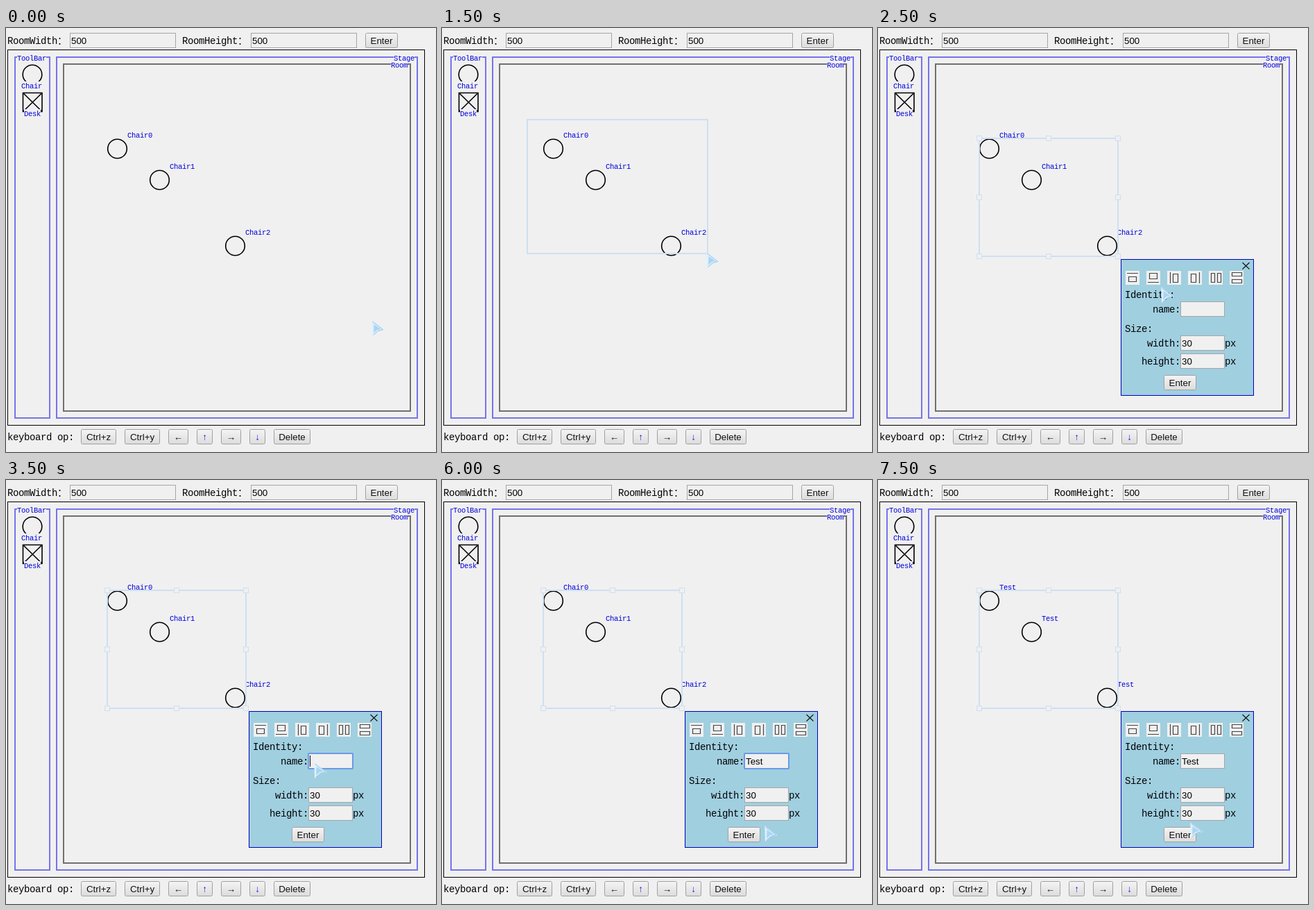
Animation, 620 px wide and 611 px high, one loop 8000 ms. Source, as an HTML page:

```html
<!DOCTYPE html>
<html lang="en">
<head>
<meta charset="utf-8">
<title>Room editor</title>
<style>
  html, body { margin: 0; width: 100%; height: 100%; overflow: hidden; background: #f0f0f0; }
  svg { display: block; }
  text { white-space: pre; }
  .mono { font: 14px "Liberation Mono", "Noto Sans CJK SC", monospace; letter-spacing: -.4px; }
  .tag { font: 10.5px "Liberation Mono", monospace; letter-spacing: -.3px; fill: #0000dc; }
  .ui { font: 13.333px "Liberation Sans", Arial, sans-serif; }
</style>
</head>
<body>
<svg id="stage" width="620" height="611" viewBox="0 0 620 611">
  <defs>
    <linearGradient id="face" x2="0" y2="1">
      <stop offset="0" stop-color="#f4f4f4"/><stop offset="1" stop-color="#dcdcdc"/>
    </linearGradient>
    <linearGradient id="glass" x2="1" y2="1">
      <stop offset="0" stop-color="#d6ecf9"/><stop offset="1" stop-color="#8fc6ec"/>
    </linearGradient>
  </defs>
</svg>
<script>
const BG = '#f0f0f0', PALE = '#cfdff2', VIOLET = '#7474ee', LOOP = 8000;
const stage = document.getElementById('stage');

function el(parent, tag, attrs, content) {
  const node = document.createElementNS('http://www.w3.org/2000/svg', tag);
  for (const key in attrs) node.setAttribute(key, attrs[key]);
  if (content) node.textContent = content;
  return parent.appendChild(node);
}
const group = parent => el(parent, 'g', {});
const rect = (p, x, y, width, height, fill, stroke = 'none', w = 1, rx = 0) =>
  el(p, 'rect', { x, y, width, height, fill, stroke, 'stroke-width': w, rx });
const path = (p, d, stroke, w, fill = 'none') =>
  el(p, 'path', { d, stroke, 'stroke-width': w, fill });
const text = (p, cls, x, y, s) => el(p, 'text', { class: cls, x, y }, s);
const circle = (cx, cy) =>
  el(stage, 'circle', { cx, cy, r: 13.8, fill: 'none', stroke: '#000', 'stroke-width': 1.6 });

// A label that knocks out the border behind it
function caption(x, y, s) {
  rect(stage, x, y - 10, s.length * 6, 12, BG);
  text(stage, 'tag', x, y, s);
}
function field(p, x, y, w, value) {
  rect(p, x + .5, y + .5, w - 1, 21, BG, '#a5a5a5');
  return text(p, 'ui', x + 2, y + 16, value);
}
function button(p, x, y, w, s, color = '#111') {
  rect(p, x + .5, y + .5, w - 1, 21, 'url(#face)', '#a0a0a0', 1, 2);
  const label = text(p, 'ui', x + w / 2, y + 16, s);
  label.setAttribute('text-anchor', 'middle');
  label.setAttribute('fill', color);
}

// Top and bottom rows
text(stage, 'mono', 2, 23, 'RoomWidth：');
field(stage, 92, 7, 153, '500');
text(stage, 'mono', 254, 23, 'RoomHeight：');
field(stage, 353, 7, 153, '500');
button(stage, 518, 7, 47, 'Enter');
text(stage, 'mono', 2, 594, 'keyboard op:');
[[108, 51, 'Ctrl+z'], [171, 51, 'Ctrl+y'], [234, 29, '←'], [275, 23, '↑', '#2020d0'],
 [310, 29, '→'], [351, 23, '↓', '#2020d0'], [386, 53, 'Delete']]
  .forEach(([x, w, s, color]) => button(stage, x, 578, w, s, color));

// Frames and toolbar
rect(stage, 2.5, 31.5, 601, 541, 'none', '#000');
rect(stage, 13, 42, 50, 520, 'none', VIOLET, 2);
rect(stage, 73, 42, 520, 520, 'none', VIOLET, 2);
rect(stage, 83, 52, 500, 500, 'none', '#707070', 2);
caption(16, 47, 'ToolBar');
caption(559, 47, 'Stage');
caption(555, 57, 'Room');
circle(38, 67);
caption(22, 87, 'Chair');
path(stage, 'M24.5 93.5h27.5v27h-27.5zl27.5 27m0-27l-27.5 27', '#000', 1.6);
caption(26, 127, 'Desk');

// Chairs
const names = [[160.5, 174], [221.5, 219], [330.5, 314]].map(([x, y]) => {
  circle(x, y);
  return text(stage, 'tag', x + 14.5, y - 16, '');
});

// Rubber band and resize box
const band = rect(stage, 123, 132, 0, 0, 'none', PALE, 2);
const chosen = group(stage);
rect(chosen, 146, 159, 200, 170, 'none', PALE, 2);
for (let i = 0; i < 9; i++) {
  if (i !== 4) rect(chosen, 142.5 + i % 3 * 100, 155.5 + Math.floor(i / 3) * 85, 7, 7, BG, PALE);
}

// Property panel
const panel = group(stage);
rect(panel, 350.5, 333.5, 191, 196, '#a0cfe0', '#0000b4');
path(panel, 'M525.5 338l10 9.5m0-9.5l-10 9.5', '#111', 1.1);
['M2 3.5h16M4.5 8.5h11v7h-11z', 'M2 16.5h16M4.5 3.5h11v8h-11z',
 'M4.5 2v16M8.5 4.5h7v12h-7z', 'M16.5 2v16M4.5 4.5h7v12h-7z',
 'M3.5 3.5h5v13h-5zM12.5 3.5h5v13h-5z', 'M3.5 2.5h14v5h-14zM3.5 12.5h14v5h-14z']
  .forEach((d, i) => {
    const icon = el(panel, 'g', { transform: `translate(${357 + i * 30} 350)` });
    rect(icon, 0, 0, 20, 20, BG);
    path(icon, d, '#444', 1.2);
  });
[[356, 389, 'Identity:'], [396, 410, 'name:'], [356, 438, 'Size:'], [388, 459, 'width:'],
 [380, 485, 'height:'], [500, 459, 'px'], [500, 485, 'px']]
  .forEach(([x, y, s]) => text(panel, 'mono', x, y, s));
const typed = field(panel, 436, 394, 64, '');
field(panel, 436, 443, 64, '30');
field(panel, 436, 469, 64, '30');
button(panel, 412, 500, 47, 'Enter');
const focus = rect(panel, 436, 394, 64, 22, 'none', '#6a9ae6', 2, 1);
const caret = rect(panel, 438, 397, 1, 16, '#000');

// Pointer
const pointer = group(stage);
path(pointer, 'M1.5 1.5L16 12.5L9 14L2 20Z', '#dff1fc', 2.2, 'url(#glass)');
path(pointer, 'M1.5 1L16.5 12.5L9.5 14.5L2.5 20.5', '#86bde6', .9);
path(pointer, 'M4 5.5L12 11.5L7.5 12.5L4 15.5Z', 'none', 0, '#a9d5f2');

// start, pointer x, pointer y, mode, typed text, caret on
const steps = [
  [0, 527, 422, 'idle'],
  [500, 140, 150, 'idle'],
  [1000, 121, 131, 'idle'],
  [1500, 381, 324, 'drag'],
  [2000, 391, 349, 'drag'],
  [2500, 408, 374, 'open'],
  [3000, 444, 408, 'open'],
  [3500, 444, 408, 'edit', '', 1],
  [4000, 444, 408, 'edit'],
  [4500, 444, 408, 'edit', '', 1],
  [5000, 444, 408, 'edit', 'T'],
  [5500, 444, 408, 'edit', 'Test'],
  [6000, 465, 499, 'edit', 'Test'],
  [7000, 437, 517, 'done', 'Test'],
  [7500, 450, 494, 'done', 'Test']
];
const show = (node, on) => { node.style.display = on ? '' : 'none'; };
let current;

function draw(step) {
  const [, x, y, mode, value = '', blink] = step;
  const open = mode !== 'idle' && mode !== 'drag';
  pointer.setAttribute('transform', `translate(${x} ${y})`);
  show(band, mode === 'drag');
  band.setAttribute('width', Math.max(0, x - 121));
  band.setAttribute('height', Math.max(0, y - 131));
  show(chosen, open);
  show(panel, open);
  show(focus, mode === 'edit');
  show(caret, blink);
  typed.textContent = value;
  names.forEach((label, i) => { label.textContent = mode === 'done' ? value : 'Chair' + i; });
}

function tick() {
  const t = performance.now() % LOOP;
  const step = steps.filter(s => s[0] <= t).pop();
  if (step !== current) draw(current = step);
  requestAnimationFrame(tick);
}
tick();
</script>
</body>
</html>
```
